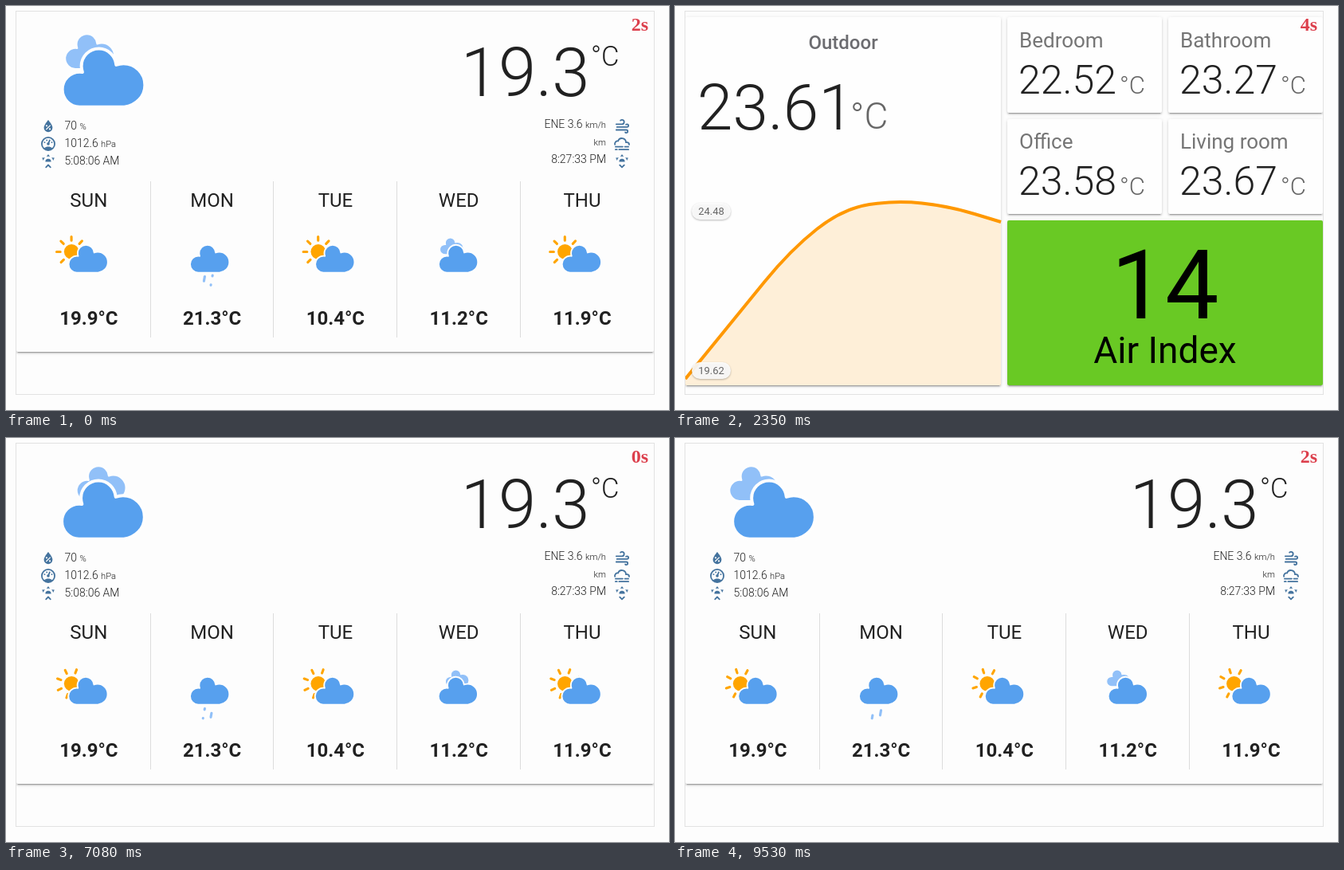
These frames come from a looping animation (832 by 507 pixels, 9.58 s). An HTML page:

```html
<!DOCTYPE html>
<html lang="en">
<head>
<meta charset="utf-8">
<title>Weather dashboard</title>
<style>
html, body { margin: 0; width: 100%; height: 100%; overflow: hidden; background: #fdfdfd; }
.frame, .page, .card, svg { position: absolute; box-sizing: border-box; }
.frame { left: 12px; top: 6px; width: 802px; height: 482px; border: 1px solid #e2e2e2; }
.page { left: 0; top: 0; width: 832px; height: 507px; clip-path: inset(7px 19px 20px 13px); }
.card {
  background: #fefefe; border-radius: 2px;
  box-shadow: 0 2px 2px rgba(0,0,0,.14), 0 1px 5px rgba(0,0,0,.12), 0 3px 1px -2px rgba(0,0,0,.2);
}
svg { left: 0; top: 0; width: 832px; height: 507px; }
text { font-family: Roboto, sans-serif; fill: #212121; }
.light { font-weight: 300; }
.attr { font-size: 14px; font-weight: 300; }
.attr tspan { font-size: 11.2px; }
.mid { text-anchor: middle; }
.end { text-anchor: end; }
.day { font-size: 24px; }
.high { font-size: 24px; font-weight: 700; }
.room { font-size: 26px; fill: #757575; }
.value { font-size: 50px; font-weight: 300; }
.unit { font-size: 31px; font-weight: 300; fill: #666; }
.tag { font-size: 13px; fill: #666; }
.pill { fill: #fdfdfd; fill-opacity: .9; filter: drop-shadow(0 1px 1px rgba(0,0,0,.3)); }
.mdi { fill: #44739e; }
.mdi .ln { fill: none; stroke: #44739e; stroke-width: 2; stroke-linecap: round; stroke-linejoin: round; }
.mdi .cut { fill: #fdfdfd; stroke: #fdfdfd; }
#timer { font: bold 24px "Liberation Serif", "Times New Roman", serif; fill: #dc3f4c; }
</style>
</head>
<body>
<div class="frame"></div>

<div class="page" id="weather">
  <div class="card" style="left:13px;top:0;width:800px;height:434px;background:#fdfdfd"></div>
  <svg viewBox="0 0 832 507">
    <defs>
      <path id="cloud" stroke="#fefefe" stroke-width="1.2" stroke-linejoin="round" d="M47.7,35.4c0-4.6-3.7-8.2-8.2-8.2c-1,0-1.9,0.2-2.8,0.5c-0.3-3.4-3.1-6.2-6.6-6.2c-3.7,0-6.7,3-6.7,6.7c0,0.8,0.2,1.6,0.4,2.3c-0.3-0.1-0.7-0.1-1-0.1c-3.7,0-6.7,3-6.7,6.7c0,3.6,2.9,6.6,6.5,6.7l17.2,0C44.2,43.3,47.7,39.8,47.7,35.4z"/>
      <g id="main"><use href="#cloud" fill="#57a0ee" y="-1"/></g>
      <path id="ray" d="M0,9V12" stroke="orange" stroke-width="2" stroke-linecap="round"/>
      <g id="cross">
        <use href="#ray"/><use href="#ray" transform="rotate(90)"/>
        <use href="#ray" transform="rotate(180)"/><use href="#ray" transform="rotate(270)"/>
      </g>
      <g id="sunny">
        <g transform="translate(20,26)">
          <g id="rays"><use href="#cross"/><use href="#cross" transform="rotate(45)"/></g>
          <circle r="6" fill="orange"/>
        </g>
        <g class="front"><use href="#main"/></g>
      </g>
      <g id="cloudy">
        <g id="back"><use href="#cloud" fill="#91c0f8" transform="translate(10,2) scale(.6)"/></g>
        <g class="front"><use href="#main"/></g>
      </g>
      <g id="rainy">
        <use href="#main"/>
        <g transform="translate(34,46) rotate(10)" stroke="#91c0f8" stroke-width="2" stroke-linecap="round" stroke-dasharray="4 7">
          <path id="drop1" d="M-6,1V9"/><path id="drop2" d="M0,-1V7"/>
        </g>
      </g>
      <g id="sunset">
        <path class="ln" d="M3,13H21M8,12.5A4,4 0 0,1 16,12.5"/>
        <path d="M12,2L14.4,5.4Q12,4.6 9.6,5.4ZM3.3,7L7.5,6.6Q5.9,8 5.1,10.8ZM20.7,7L16.5,6.6Q18.1,8 18.9,10.8Z"/>
      </g>
    </defs>

    <use href="#cloudy" transform="translate(13,-13.7) scale(3.28)"/>
    <text class="light end" x="732.5" y="113" font-size="85">19.3</text>
    <text class="light" x="734" y="75" font-size="34.5">°C</text>

    <g class="attr">
      <text x="73.5" y="155">70 <tspan>%</tspan></text>
      <text x="73.5" y="177">1012.6 <tspan>hPa</tspan></text>
      <text x="73.5" y="199">5:08:06 AM</text>
      <text class="end" x="753" y="153">ENE 3.6 <tspan>km/h</tspan></text>
      <text class="end" x="753" y="175"><tspan>km</tspan></text>
      <text class="end" x="753" y="197">8:27:33 PM</text>
    </g>

    <g class="mdi">
      <g transform="translate(42.2,140.2) scale(.9)">
        <path d="M12,3.2C12,3.2 6,10 6,14A6,6 0 0,0 18,14C18,10 12,3.2 12,3.2Z"/>
        <path class="cut" stroke-width="1.4" d="M15,10.5L9,16.5"/>
        <circle class="cut" stroke="none" stroke-width="0" cx="9.75" cy="11.25" r="1.25"/>
        <circle class="cut" stroke-width="0" cx="14.25" cy="15.75" r="1.25"/>
      </g>
      <g transform="translate(42.2,162.2) scale(.9)">
        <circle class="ln" cx="12" cy="12" r="9"/>
        <path d="M6.2,18.2C8.2,16.7 10,16 12,16S15.9,16.7 17.8,18.2L12,21.5Z"/>
        <circle cx="7" cy="10" r="1"/><circle cx="10" cy="7" r="1"/><circle cx="17" cy="10" r="1"/>
        <circle cx="12" cy="12" r="2"/><path class="ln" d="M14,7L12,12"/>
      </g>
      <g transform="translate(42.2,184.2) scale(.9)">
        <use href="#sunset"/><path class="ln" d="M8.9,20.1L12,17L15.1,20.1"/>
      </g>
      <g transform="translate(762.2,140.2) scale(.9)">
        <path class="ln" d="M4,9H12A3,3 0 0,0 12,3Q10.8,3 9.9,3.9M5,13H19A2,2 0 0,0 19,9Q18.2,9 17.6,9.6M4,17H18A2,2 0 0,1 18,21Q17.1,21 16.6,20.4"/>
      </g>
      <g transform="translate(762.2,162.2) scale(.9)">
        <path class="ln" d="M2.1,13A4,4 0 0,1 6.6,8.1A5.6,5.6 0 0,1 17.5,9.5V10H19A3,3 0 0,1 22,13M3,16H13M16,16H21M3,20H5M8,20H21"/>
      </g>
      <g transform="translate(762.2,184.2) scale(.9)">
        <use href="#sunset"/><path class="ln" d="M8.9,17.2L12,20.3L15.1,17.2"/>
      </g>
    </g>
    <g id="forecast"></g>
  </svg>
</div>

<div class="page" id="sensors">
  <div class="card" style="left:13px;top:14px;width:396px;height:462px"></div>
  <div class="card" style="left:417px;top:14px;width:194px;height:120px"></div>
  <div class="card" style="left:619px;top:14px;width:194px;height:120px"></div>
  <div class="card" style="left:417px;top:142px;width:194px;height:119px"></div>
  <div class="card" style="left:619px;top:142px;width:194px;height:119px"></div>
  <div class="card" style="left:417px;top:269px;width:396px;height:207px;background:#69c924"></div>
  <svg viewBox="0 0 832 507">
    <text class="mid" x="211" y="54" font-size="24" font-weight="500" style="fill:#6c6c70">Outdoor</text>
    <text class="light" x="28" y="155" font-size="80">23.61</text>
    <text class="unit" x="220" y="154" style="font-size:46px">°C</text>
    <path id="area" fill="#ff9800" fill-opacity=".15"/>
    <path id="curve" fill="none" stroke="#ff9800" stroke-width="4"/>
    <rect class="pill" x="21" y="247" width="49" height="21" rx="10.5"/>
    <rect class="pill" x="21" y="447" width="49" height="21" rx="10.5"/>
    <text class="tag mid" x="45.5" y="262">24.48</text>
    <text class="tag mid" x="45.5" y="462">19.62</text>
    <g id="rooms"></g>
    <text class="mid" x="615" y="392" font-size="120" style="fill:#000">14</text>
    <text class="mid" x="615" y="448" font-size="46" style="fill:#000">Air Index</text>
  </svg>
</div>

<svg viewBox="0 0 832 507"><text id="timer" x="784.8" y="31">2s</text></svg>

<script>
const LOOP = 9580, SENSORS_AT = 1330, WEATHER_AT = 6290;
const $ = id => document.getElementById(id);

const days = [['SUN', '19.9', 'sunny'], ['MON', '21.3', 'rainy'], ['TUE', '10.4', 'sunny'],
              ['WED', '11.2', 'cloudy'], ['THU', '11.9', 'sunny']];
$('forecast').innerHTML = days.map(([day, high, icon], i) => {
  const x = 154.8 * i, mid = 103.8 + x;
  const rule = i < 4 ? `<rect x="${Math.floor(181 + 154.7 * i)}" y="220" width="1" height="196" fill="#dcdcdc"/>` : '';
  return `${rule}<text class="day mid" x="${mid}" y="252">${day}</text>
    <use href="#${icon}" transform="translate(${51 + x},267.7) scale(1.5625)"/>
    <text class="high mid" x="${mid}" y="400">${high}°C</text>`;
}).join('');

const rooms = [['Bedroom', '22.52'], ['Bathroom', '23.27'], ['Office', '23.58'], ['Living room', '23.67']];
$('rooms').innerHTML = rooms.map(([name, value], i) =>
  `<g transform="translate(${i % 2 * 202},${(i >> 1) * 127})">
    <text class="room" x="432" y="52">${name}</text>
    <text class="value" x="431" y="109.5">${value}</text>
    <text class="unit" x="558" y="109.5">°C</text></g>`).join('');

// Smooth the readings with quadratic curves through their midpoints.
const levels = [468, 387, 306, 254, 244, 251, 271];
const px = i => 13 + 66 * i;
let line = `M13,${levels[0]}`;
for (let i = 1; i < 6; i++) {
  line += `Q${px(i)},${levels[i]} ${px(i) + 33},${(levels[i] + levels[i + 1]) / 2}`;
}
line += `L409,${levels[6]}`;
$('curve').setAttribute('d', line);
$('area').setAttribute('d', line + 'V476H13Z');

const ticks = [[0, 2], [340, 1], [1330, 0], [2350, 4], [3320, 3], [4300, 2],
               [5320, 1], [6290, 0], [7260, 4], [8230, 3], [9200, 2]];
const fronts = document.querySelectorAll('.front');
const swing = (x, period) => {
  x %= period;
  return Math.min(x, period - x);
};
const move = (el, x) => el.setAttribute('transform', `translate(${x.toFixed(3)},0)`);

function draw(t) {
  const sensors = t >= SENSORS_AT && t < WEATHER_AT;
  $('sensors').style.display = sensors ? '' : 'none';
  $('weather').style.display = sensors ? 'none' : '';
  $('timer').textContent = ticks.filter(([at]) => at <= t).pop()[1] + 's';
  if (sensors) return;

  // The icons run on from the second weather view into the start of the loop.
  const s = (t >= WEATHER_AT ? t - WEATHER_AT : t + 3660) / 1000;
  fronts.forEach(el => move(el, swing(1.63 + s * 4 / 3, 4)));
  move($('back'), swing(18.25 + s * 30 / 7, 30) - 5);
  $('rays').setAttribute('transform', `rotate(${-12 + 40 * s})`);
  const fall = 9 + 12.5 * s;
  $('drop1').setAttribute('stroke-dashoffset', -fall);
  $('drop2').setAttribute('stroke-dashoffset', 3.125 - fall);
}

const start = performance.now();
function tick() {
  draw((performance.now() - start) % LOOP);
  requestAnimationFrame(tick);
}
tick();
</script>
</body>
</html>
```
